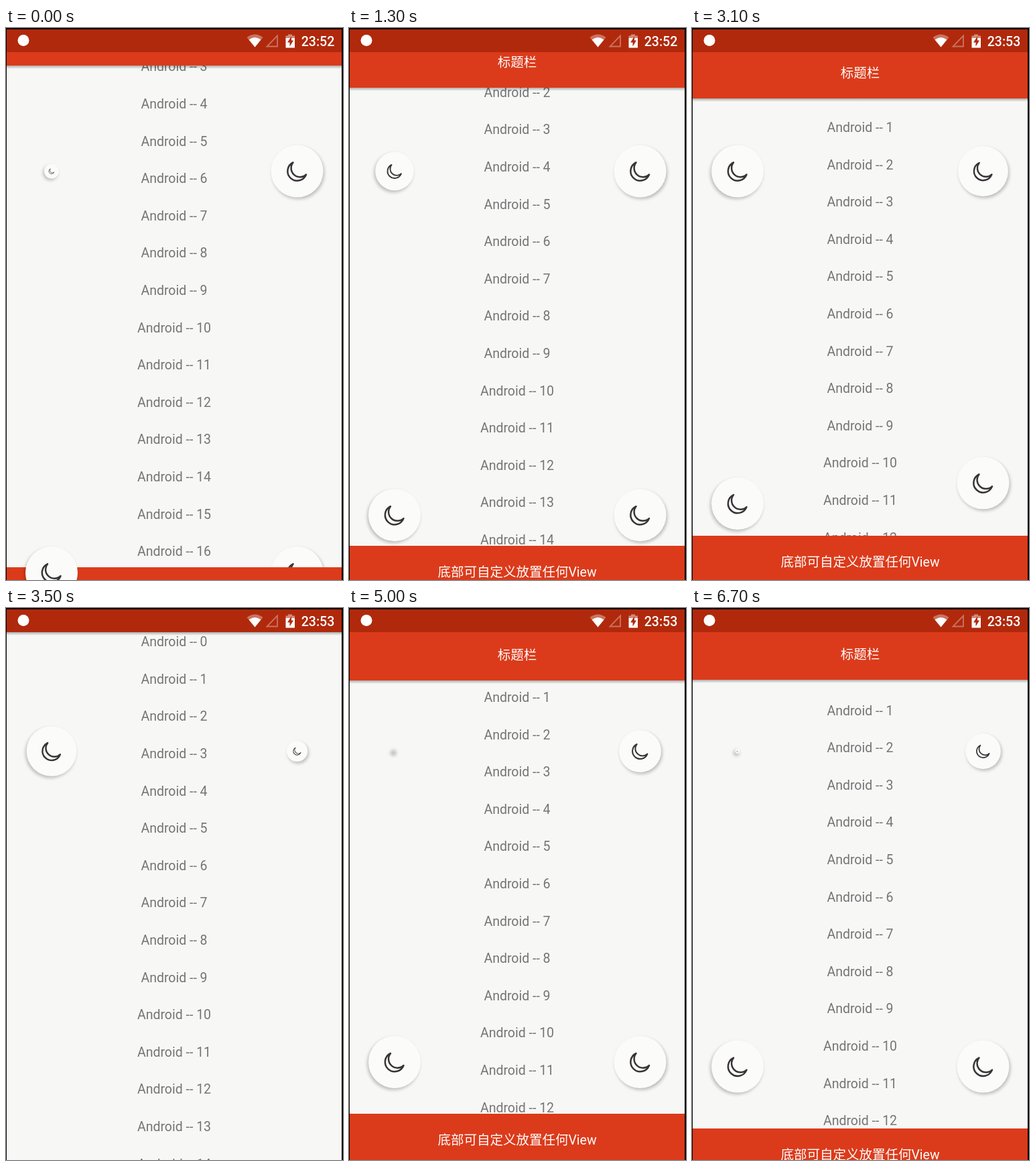
These frames come from a looping animation (503x823 px, 6.8 s). An HTML page:

```html
<!DOCTYPE html>
<html lang="zh">
<head>
<meta charset="utf-8">
<title>Scroll behaviors</title>
<style>
  html, body { margin: 0; width: 100%; height: 100%; overflow: hidden; background: #000; }
  svg { display: block; width: 503px; height: 823px; }
  text { font: 19.5px Roboto, "Noto Sans CJK SC", "Noto Sans CJK", sans-serif; text-anchor: middle; fill: #fff; }
  #list text { fill: #757575; }
  #clock { font-weight: 500; }
  .bar { fill: #db3b1b; }
  .shade { fill: #000; opacity: .24; filter: blur(2.6px); }
  .disc { fill: #fbfbfa; }
  .moon { fill: none; stroke: #383436; stroke-width: 2.5; stroke-linejoin: round; }
</style>
</head>
<body>
<svg viewBox="0 0 503 823">
  <defs>
    <clipPath id="screen"><rect x="1" y="2" width="500" height="821"/></clipPath>
    <linearGradient id="drop" x2="0" y2="1">
      <stop stop-color="#000" stop-opacity=".3"/>
      <stop offset="1" stop-color="#000" stop-opacity="0"/>
    </linearGradient>
  </defs>
  <g clip-path="url(#screen)">
    <rect width="503" height="823" fill="#f7f7f6"/>
    <g id="list"></g>
    <g id="behind"></g>
    <g id="header">
      <rect class="bar" y="-72" width="503" height="72"/>
      <rect width="503" height="5" fill="url(#drop)"/>
      <text x="251" y="-31.5">标题栏</text>
    </g>
    <g id="footer">
      <rect class="bar" width="503" height="90"/>
      <text x="251" y="46">底部可自定义放置任何View</text>
    </g>
    <g id="front"></g>
    <rect width="503" height="36" fill="#b0290c"/>
    <circle cx="26" cy="18.5" r="8.5" fill="#fff"/>
    <path d="M359.5 14Q371.5 5 383.5 14L371.5 28.5Z" fill="#fff" opacity=".35"/>
    <path d="M362.5 17.5Q371.5 10.5 380.5 17.5L371.5 28.5Z" fill="#fff"/>
    <path d="M389.5 27.5H405V11.5Z" fill="none" stroke="#fff" stroke-width="1.8" opacity=".35"/>
    <path d="M417.5 11.5H421V9.5H427V11.5H431V16H417.5Z" fill="#fff" opacity=".45"/>
    <path d="M417.5 15H431V29.5H417.5Z" fill="#fff"/>
    <path d="M426 12.5L420 21.5H423.5V27.5L429 18.5H426Z" fill="#b0290c"/>
    <text id="clock" x="465.5" y="26.5"></text>
  </g>
</svg>
<script>
const LOOP = 6800, TICK = 100, ROW = 55.6, RADIUS = 39, REST = 677, DROP = 188;
const byId = id => document.getElementById(id);
const mix = (a, b, u) => a + (b - a) * u;

function ease(u) {
  u = Math.min(1, Math.max(0, u));
  return u * u * (3 - 2 * u);
}

// Turning points of the list scroll: time, position of the first row.
const turns = [[0, -109.5], [200, -130], [900, 122], [1450, -46], [1800, 95.5],
  [3000, 95.5], [3700, 39], [4350, 39], [4800, 96], [6000, -154], [6700, 97]];

function scroll(t) {
  const i = Math.max(1, turns.findIndex(([time]) => time >= t));
  const [t0, y0] = turns[i - 1], [t1, y1] = turns[i];
  return mix(y0, y1, ease((t - t0) / (t1 - t0)));
}

// A part starts shown; every toggle time hides or shows it again.
const part = (toggles, span = 400) => t =>
  toggles.reduce((p, start, i) => p + (i % 2 ? 1 : -1) * ease((t - start) / span), 1);

const early = [-260, 548, 1166, 1400];
const shown = {
  header: part([...early, 3050, 4350, 5320, 6330]),
  footer: part([...early, 3050, 4350, 5410, 6450]),
  topLeft: part([...early, 3450, 5200, 6374]),
  topRight: part([2990, 4350, 4960, 6142], 900),
  lowLeft: part([...early, 2995, 4350, 5275, 6345]),
  lowRight: part([...early, 3080, 4370, 5490, 6345])
};

function add(parent, tag, attrs) {
  const el = document.createElementNS("http://www.w3.org/2000/svg", tag);
  for (const a in attrs) el.setAttribute(a, attrs[a]);
  return parent.appendChild(el);
}

const move = (el, x, y) => el.setAttribute("transform", `translate(${x} ${y})`);

function makeFab(layer, x) {
  const g = add(byId(layer), "g", {});
  const shade = add(g, "circle", { class: "shade", cx: x < 251 ? -1.7 : 1.7, cy: 2.6 });
  const face = add(g, "g", {});
  add(face, "circle", { class: "disc", r: RADIUS });
  add(face, "path", { class: "moon", d: "M-6 -13A14.3 14.3 0 1 0 13.5 5A13.3 13.3 0 0 1 -6 -13Z" });
  return (y, scale) => {
    move(g, x, y);
    shade.setAttribute("r", Math.max(RADIUS * scale, 4.5));
    face.setAttribute("transform", `scale(${Math.max(0, scale)})`);
  };
}

for (let i = 0; i < 20; i++) {
  add(byId("list"), "text", { x: 251, y: i * ROW + 7 }).textContent = "Android -- " + i;
}

const topLeft = makeFab("behind", 68), topRight = makeFab("behind", 434.5);
const lowRight = makeFab("behind", 434.5), lowLeft = makeFab("front", 68);

function draw() {
  const t = Math.floor(performance.now() % LOOP / TICK) * TICK;
  move(byId("list"), 0, scroll(t));
  move(byId("header"), 0, Math.round(mix(36, 108, shown.header(t))));
  move(byId("footer"), 0, Math.round(mix(823, 754, shown.footer(t))));
  topLeft(213.5, shown.topLeft(t));
  topRight(213.5, shown.topRight(t));
  lowLeft(mix(REST + DROP, REST, shown.lowLeft(t)), 1);
  lowRight(mix(REST + DROP, REST, shown.lowRight(t)), 1);
  byId("clock").textContent = t < 1400 ? "23:52" : "23:53";
  requestAnimationFrame(draw);
}
draw();
</script>
</body>
</html>
```
